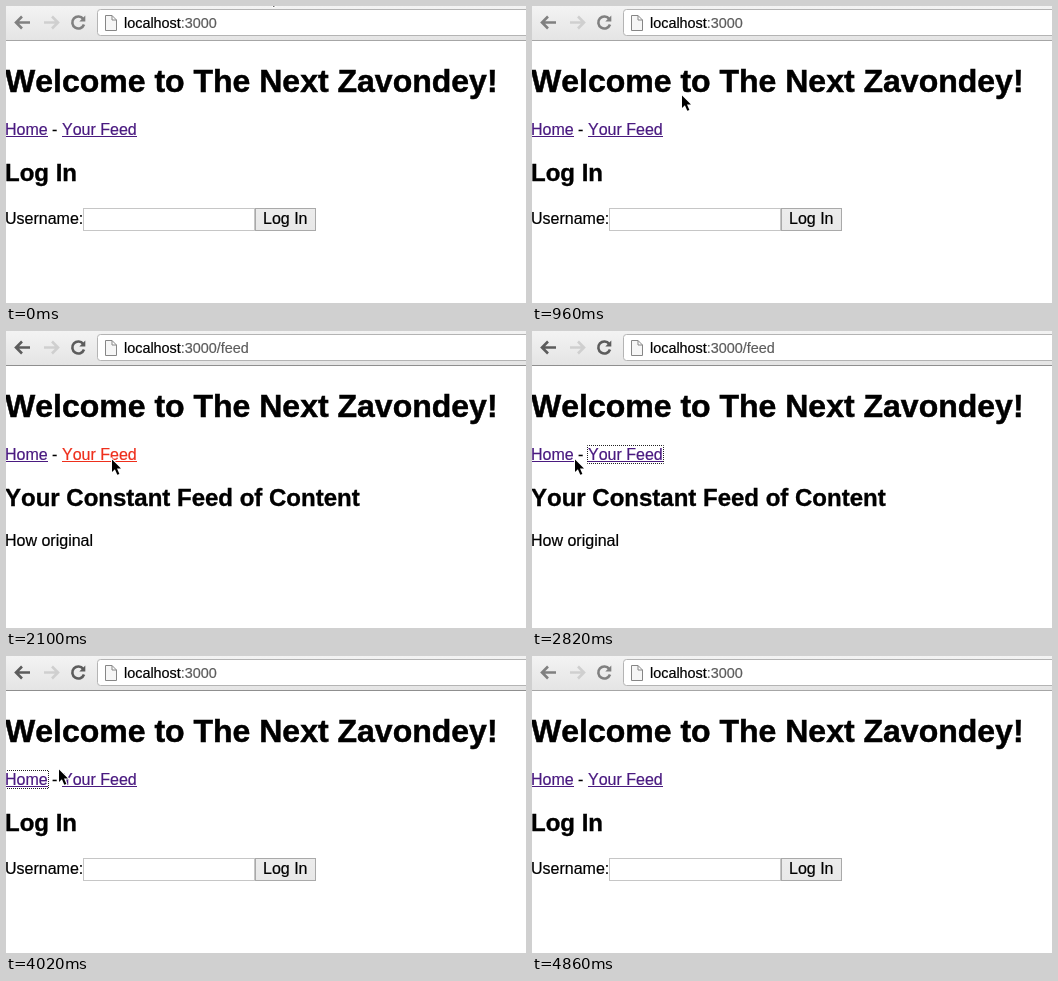
An HTML page that plays this animation: 520x297 px, repeating every 4920 ms.

```html
<!DOCTYPE html>
<html lang="en">
<head>
<meta charset="utf-8">
<title>Log In</title>
<style>
  html, body { margin: 0; width: 100%; height: 100%; overflow: hidden; background: #fff; }
  svg { display: block; width: 520px; height: 297px; }
  text {
    font: 16px "Liberation Sans", Arial, sans-serif; font-kerning: none; white-space: pre;
    fill: currentColor; stroke: currentColor; stroke-width: .2;
  }
  .h1 { font-size: 32px; font-weight: bold; stroke-width: .5; }
  .h2 { font-size: 24px; font-weight: bold; stroke-width: .35; }
  .url { font-size: 14.4px; color: #5c5c5c; }
  .host { fill: #000; stroke: #000; }
  .icon { fill: none; stroke-width: 2.6; }
  .link { color: #4a1a80; fill: currentColor; }
  .link.active { color: #ee2f1c; }
  .ring { fill: none; stroke: #222; stroke-dasharray: 1 1; stroke-dashoffset: .5; }
</style>
</head>
<body>
<svg viewBox="0 0 520 297">
  <defs>
    <linearGradient id="bar" x2="0" y2="1">
      <stop offset="0" stop-color="#f3f3f3"/><stop offset="1" stop-color="#e4e4e4"/>
    </linearGradient>
    <linearGradient id="btn" x2="0" y2="1">
      <stop offset="0" stop-color="#ececec"/><stop offset="1" stop-color="#e8e8e8"/>
    </linearGradient>
  </defs>

  <rect width="520" height="35" fill="url(#bar)"/>
  <rect id="edge" y="34" width="520" height="1"/>
  <path class="icon" stroke="#cfcfcf" d="M38 16.5H51.5M46 10.5L52 16.5L46 22.5"/>
  <g id="icons" class="icon">
    <path d="M24 16.5H10.5M16 10.5L10 16.5L16 22.5"/>
    <path d="M77.2 13A6 6 0 1 0 78 18.5"/>
    <path d="M79.3 9.5V15.5H73.3Z" stroke="none" id="tip"/>
  </g>
  <rect x="91.5" y="3.5" width="440" height="26" rx="3" fill="#fff" stroke="#b4b4b4"/>
  <path d="M99.5 9.5H106L110.5 14V24.5H99.5ZM106 9.5V14H110.5" fill="#f6f6f6" stroke="#868686"/>
  <text class="url" x="118" y="22"><tspan class="host">localhost</tspan>:3000<tspan id="path">/feed</tspan></text>

  <text class="h1" x="-1" y="86">Welcome to The Next Zavondey!</text>
  <g id="home" class="link">
    <text x="-1" y="129">Home</text>
    <rect y="130" width="42" height="1"/>
  </g>
  <text x="46" y="129">-</text>
  <g id="feed" class="link">
    <text x="56" y="129">Your Feed</text>
    <rect x="56" y="130" width="75" height="1"/>
  </g>
  <rect id="homeRing" class="ring" x="-.5" y="114.5" width="43" height="18"/>
  <rect id="feedRing" class="ring" x="55.5" y="114.5" width="76" height="18"/>

  <g id="loginPage">
    <text class="h2" x="-1" y="175">Log In</text>
    <text x="-1" y="218">Username:</text>
    <rect x="77.5" y="202.5" width="171" height="22" fill="#fff" stroke="#c6c6c6"/>
    <rect x="249.5" y="202.5" width="60" height="22" fill="url(#btn)" stroke="#a9a9a9"/>
    <text x="257" y="218">Log In</text>
  </g>
  <g id="feedPage">
    <text class="h2" x="-1" y="175">Your Constant Feed of Content</text>
    <text x="-1" y="215">How original</text>
  </g>

  <path id="cursor" d="M1 1.5V14L3.9 11.3L6.3 16.8L8.4 15.9L6 10.5H10Z" fill="#000" stroke="#fff" stroke-width="2" paint-order="stroke"/>
</svg>
<script>
const LOOP = 4920, STEP = 60;
const $ = id => document.getElementById(id);
const show = (id, on) => { $(id).style.display = on ? "" : "none"; };

const smooth = u => u * u * (3 - 2 * u);
const easeOut = u => 1 - (1 - u) ** 2;
const speedUp = u => u ** 1.16;

// start time, number of steps, from, to, easing
const moves = [
  [480, 9, [261, -16], [149, 88], smooth],
  [1020, 4, [149, 88], [105, 127], easeOut],
  [2580, 9, [105, 127], [26, 127], easeOut],
  [4020, 7, [26, 127], [275, -20], speedUp]
];

function cursorAt(t) {
  let pos = moves[0][2];
  for (const [start, n, a, b, ease] of moves) {
    if (t < start) break;
    const p = ease(Math.min(1, (Math.floor((t - start) / STEP) + 1) / n));
    pos = a.map((v, i) => Math.round(v + (b[i] - v) * p));
  }
  return pos;
}

function draw(t) {
  const within = (a, b) => t >= a && t < b;
  const onFeed = within(2100, 3540);
  const focused = within(1620, 4860);
  const ink = focused ? "#5c5c5c" : "#808080";

  show("feedPage", onFeed);
  show("path", onFeed);
  show("loginPage", !onFeed);
  show("feedRing", within(2220, 3360));
  show("homeRing", within(3540, 4860));
  $("feed").classList.toggle("active", within(2040, 2220));
  $("home").classList.toggle("active", within(3360, 3540));

  $("icons").style.stroke = ink;
  $("tip").style.fill = ink;
  $("edge").style.fill = focused ? "#8f8f8f" : "#a6a6a6";
  $("cursor").setAttribute("transform", `translate(${cursorAt(t)})`);
}

const t0 = performance.now();
function tick() {
  draw((performance.now() - t0) % LOOP);
  requestAnimationFrame(tick);
}
tick();
</script>
</body>
</html>
```
